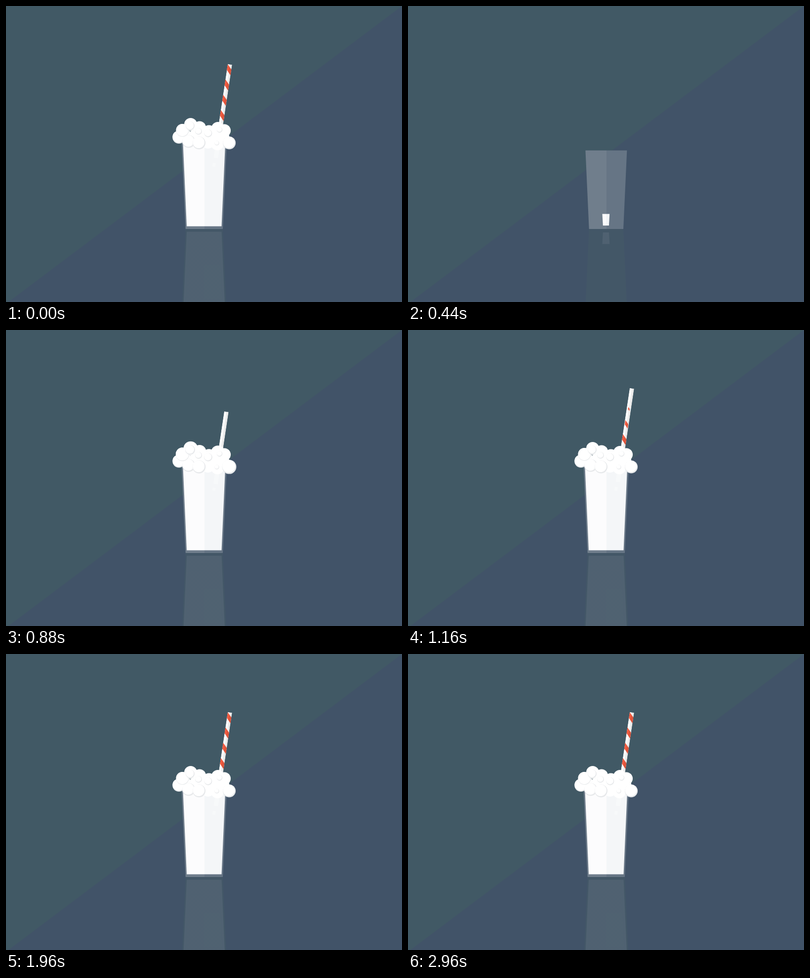
Write an HTML page with a canvas that moves like this. It is 800x600 px and loops after 3040 ms.

```html
<!DOCTYPE html>
<html lang="en">
<head>
<meta charset="utf-8">
<title>Milkshake</title>
<style>
html, body { margin: 0; width: 100%; height: 100%; overflow: hidden; background: #415368; }
canvas { display: block; width: 800px; height: 600px; }
</style>
</head>
<body>
<canvas id="stage" width="800" height="600"></canvas>
<script>
const LOOP = 3040;
const CUT = 40;
const FLOOR = 452;
const PUFF_R = 13;
const ctx = document.getElementById('stage').getContext('2d');

// Centres of the cream puffs; each group pops up in list order
const PLAIN = [[408, 276], [427, 279.5], [441, 252.5], [410, 254.5], [391, 246.5], [428, 248], [373, 240]];
const SHADED = [[349.3, 266], [369, 274.5], [390, 277.5], [356.5, 252], [451, 277.5]];
const DIMPLES = [[426, 278], [431.5, 251], [389, 254], [408.5, 258], [372, 243]];

const clamp = v => Math.min(1, Math.max(0, v));
const easeOut = (t, start, span) => Math.sin(clamp((t - start) / span) * Math.PI / 2);

function spring(t, start) {
  const s = (t - start) / 1000;
  return s <= 0 ? 0 : 1 - Math.exp(-11 * s) * Math.cos(s * Math.PI * 5);
}

function poly(fill, ...pts) {
  ctx.fillStyle = fill;
  ctx.beginPath();
  for (let i = 0; i < pts.length; i += 2) ctx.lineTo(pts[i], pts[i + 1]);
  ctx.fill();
}

function disc(fill, x, y, r) {
  ctx.fillStyle = fill;
  ctx.beginPath();
  ctx.arc(x, y, Math.max(0, r), 0, Math.PI * 2);
  ctx.fill();
}

// Draw around a point at a given scale
function scaled(x, y, sx, sy, draw) {
  if (sx <= 0 || sy === 0) return;
  ctx.save();
  ctx.translate(x, y);
  ctx.scale(sx, sy);
  draw();
  ctx.restore();
}

// Hard split into two colours just right of the middle
function halves(left, right) {
  const g = ctx.createLinearGradient(-50, 0, 50, 0);
  g.addColorStop(0, left);
  g.addColorStop(0.507, left);
  g.addColorStop(0.507, right);
  g.addColorStop(1, right);
  return g;
}

// Tapered cup standing on y = base
function cup(bottom, top, base, height, left, right = left) {
  poly(halves(left, right), -bottom, base, -top, base - height, top, base - height, bottom, base);
}

function background() {
  ctx.fillStyle = '#415368';
  ctx.fillRect(0, 0, 800, 600);
  poly('#415965', 0, 0, 800, 0, 5, 600, 0, 600);
}

function glass(t, left, right) {
  scaled(400.4, FLOOR, easeOut(t, 113, 440), easeOut(t, 59, 519),
    () => cup(37.6, 45.5, 0, 174, left, right));
}

function milk(t, left, right) {
  scaled(399.8, 444.8, easeOut(t, 408, 300), easeOut(t, 414, 300), () => {
    ctx.translate(0.5, 0);
    cup(35.2, 42.7, 1.8, 168, left, right);
  });
}

function reflection(t) {
  scaled(0, FLOOR * 2, 1, -1, () => {
    glass(t, '#435767');
    milk(t, 'rgba(255,242,255,.065)');
  });
}

// Origin at the lower end, y along the straw
function straw(t, draw) {
  const grow = easeOut(t, 634, 440);
  if (!grow) return;
  ctx.save();
  ctx.translate(421.2, 326);
  ctx.rotate(Math.atan2(18, 120));
  ctx.scale(1, grow);
  draw();
  ctx.restore();
}

function strawBody(t) {
  straw(t, () => {
    ctx.beginPath();
    ctx.rect(-4.5, -210, 9, 210);
    ctx.clip();
    ctx.fillStyle = '#fff';
    ctx.fillRect(-4.5, -210, 9, 210);
    for (let i = 0; i < 4; i++) {
      const s = easeOut(t, 1180 - i * 80, 260);
      scaled(0, -199 + i * 31.3, s, s,
        () => poly('#f05b40', -4.6, -11, 4.6, -1, 4.6, 11, -4.6, 1));
    }
    ctx.fillStyle = 'rgba(0,0,0,.08)';
    ctx.fillRect(0, -210, 4.5, 210);
  });
}

function strawInMilk(t) {
  straw(t, () => {
    ctx.fillStyle = 'rgba(255,255,255,.32)';
    ctx.fillRect(-4.5, -60, 9, 42);
    ctx.fillRect(-4.5, -8, 6, 8);
  });
}

function puff(t, start, x, y, r, shade = 0) {
  const s = spring(t, start);
  scaled(x, y, s, s, () => {
    if (shade) disc('#e7e9eb', 0, 0, r);
    disc('#fff', -shade * 0.35, -shade / 2, r - shade / 2);
  });
}

function cream(t) {
  const late = (i, list) => 565 + 110 * ((i + 1) / list.length) ** 2;
  for (let x = 363; x <= 437; x += 18.5) puff(t, 570, x, 265, 14);
  PLAIN.forEach(([x, y], i) => puff(t, late(i, PLAIN), x, y, PUFF_R));
  SHADED.forEach(([x, y], i) => puff(t, late(i, SHADED), x, y, PUFF_R, clamp((y - 235) / 40) * 2.4));
  DIMPLES.forEach(([x, y], i) => puff(t, late(i, DIMPLES), x, y, 4.6 + i * 1.1, 1.3 + i * 0.15));
}

function render(now) {
  let t = now % LOOP;
  if (t < CUT) t += LOOP;
  background();
  reflection(t);
  glass(t, '#707e8c', '#667585');
  strawBody(t);
  milk(t, '#fcfcfd', '#f4f6f8');
  strawInMilk(t);
  cream(t);
}

const origin = performance.now();
function tick() {
  render(performance.now() - origin);
  requestAnimationFrame(tick);
}
tick();
</script>
</body>
</html>
```
